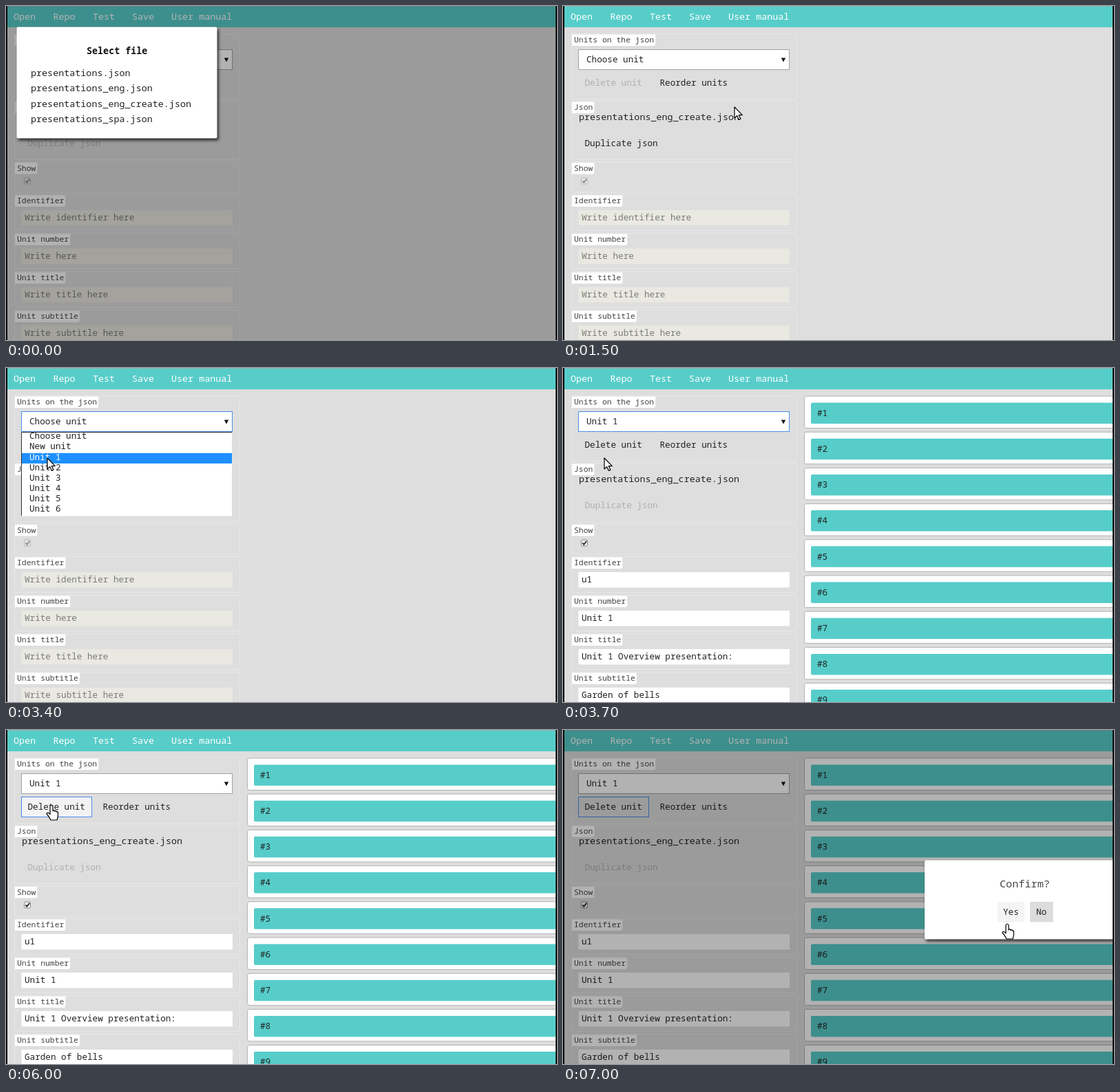
Animation of 800 by 486 pixels, one loop 7100 ms. Source, as an HTML page:

```html
<!DOCTYPE html>
<html lang="en">
<head>
<meta charset="utf-8">
<style>
html, body { margin: 0; width: 100%; height: 100%; overflow: hidden; background: #000; }
svg { display: block; }
text { font-family: "Noto Sans Mono", "DejaVu Sans Mono", monospace; }
.dialog { filter: drop-shadow(2px 3px 2px rgba(0, 0, 0, .75)); }
</style>
</head>
<body>
<svg width="800" height="486" viewBox="0 0 800 486">
  <g id="page"></g>
  <rect id="shade" width="800" height="486"/>
  <g id="popup"></g>
  <path d="M0 0H2V486H0ZM798 0H800V486H798Z"/>
  <path id="cursor" fill="#fff" stroke="#000" stroke-width="1.2" stroke-linejoin="round"/>
</svg>
<script>
const LOOP = 7100, STEP = 100;
const TEAL = '#57cdc9', BLUE = '#4a8de8', INK = '#222';
const SMALL = 11.4, MID = 12.65, BIG = 13.4;
const FILES = ['presentations.json', 'presentations_eng.json', 'presentations_eng_create.json', 'presentations_spa.json'];
const OPTIONS = ['Choose unit', 'New unit', 'Unit 1', 'Unit 2', 'Unit 3', 'Unit 4', 'Unit 5', 'Unit 6'];
// legend, box top, placeholder, loaded value
const FIELDS = [
  ['Identifier', 275, 'Write identifier here', 'u1'],
  ['Unit number', 331, 'Write here', 'Unit 1'],
  ['Unit title', 387, 'Write title here', 'Unit 1 Overview presentation:'],
  ['Unit subtitle', 443, 'Write subtitle here', 'Garden of bells']
];
const ARROW = 'M0 0V16L3.7 12.6L6.4 18.4L8.9 17.3L6.3 11.7H11.3Z';
const HAND = 'M-2 2Q0 -1.5 2 2V9Q4 6.5 5 9.5Q7 7.5 8 10.5Q9.5 9 9.5 12V15Q9.5 18 8 22H-1Q-4 16 -7 13Q-6 9.5 -2 13.5Z';
// pointer stops: time, x, y
const PATH = [
  [0, 720, 500], [800, 266, 150], [900, 264, 150], [1500, 249, 147], [1600, 249, 147],
  [2400, 130, 80], [2600, 130, 80], [3400, 60, 131], [3900, 60, 131], [4100, 76, 131],
  [4300, 76, 131], [4400, 83, 131], [4800, 83, 131], [5600, 66, 111], [5700, 66, 109],
  [6100, 66, 109], [7000, 645, 282], [LOOP, 645, 282]
];

const el = id => document.getElementById(id);
const clamp = v => Math.max(0, Math.min(1, v));
const rect = (x, y, w, h, fill, extra = '') =>
  `<rect x="${x}" y="${y}" width="${w}" height="${h}" fill="${fill}" ${extra}/>`;
const text = (x, y, size, s, fill = INK, extra = '') =>
  `<text x="${x}" y="${y}" font-size="${size}" fill="${fill}" ${extra}>${s}</text>`;
const inside = (p, x, y, w, h) => p.x >= x && p.x < x + w && p.y >= y && p.y < y + h;

function group(label, y, h) {
  const tab = label.length * 6.84 + 5;
  return rect(12.5, y - .5, 327, h, 'none', 'stroke="#e7e7e7" rx="2"') +
    `<path d="M13 ${y + .5}h${tab}v13.5q0 3 -3 3h-${tab - 3}z" fill="#fff"/>` +
    text(16, y + 12.3, SMALL, label, '#444');
}

function pointer(t) {
  const i = PATH.findIndex(k => k[0] > t);
  const [t0, x0, y0] = PATH[i - 1], [t1, x1, y1] = PATH[i];
  const u = (t - t0) / (t1 - t0), e = u * u * (3 - 2 * u);
  return { x: x0 + (x1 - x0) * e, y: y0 + (y1 - y0) * e };
}

function page(s) {
  let out = rect(0, 0, 800, 486, '#dedede') + rect(0, 0, 800, 31, TEAL) + rect(0, 0, 800, 1, '#8fb5b4');
  [['Open', 11], ['Repo', 68.5], ['Test', 126], ['Save', 183], ['User manual', 240]]
    .forEach(([label, x]) => out += text(x, 20, BIG, label, '#fff'));

  out += group('Units on the json', 41, 95) +
    rect(22.5, 63.5, 306, 29, '#fff', `stroke="${s.focus === 'select' ? BLUE : '#a3a3a3'}"`) +
    text(34, 82, MID, s.unit ? 'Unit 1' : 'Choose unit') +
    `<path d="M316.8 75.5h6.4l-3.2 6z" fill="#111"/>`;
  if (s.hover === 'delete') out += rect(22.5, 97, 102, 30, '#f3f3f3');
  if (s.focus === 'delete') out += rect(22.5, 97.5, 102, 29, 'none', `stroke="${BLUE}"`);
  out += text(31.5, 116, MID, 'Delete unit', s.unit ? INK : '#b0b0b0') +
    text(140.5, 116, MID, 'Reorder units');

  out += group('Json', 139, 85) +
    (s.file ? text(23, 166, BIG, FILES[2]) : '') +
    text(31.5, 204, MID, 'Duplicate json', s.file && !s.unit ? INK : '#b0b0b0');

  const tick = s.unit ? INK : '#888';
  out += group('Show', 227.5, 44) +
    rect(26.5, 250, 9, 9, s.unit ? '#f4f4f4' : '#e4e4e4', `rx="1.5" stroke="${s.unit ? '#888' : '#b5b5b5'}"`) +
    `<path d="M28.3 254.5l2 2.3l4 -5" fill="none" stroke="${tick}" stroke-width="1.8"/>`;

  for (const [label, y, hint, value] of FIELDS)
    out += group(label, y, 52) + rect(22.5, y + 22, 306.5, 22.5, s.unit ? '#fff' : '#e9e8e1') +
      text(27, y + 37.3, MID, s.unit ? value : hint, s.unit ? INK : '#7c7c7a');

  if (s.unit) for (let i = 0; i < 9; i++) {
    const y = 41 + i * 52.2;
    out += rect(350.5, y, 470, 46.5, '#fff', 'rx="3" stroke="#b2b2b2"') +
      rect(360, y + 9.5, 450, 30.5, TEAL, 'rx="2"') + text(369, y + 28.7, MID, '#' + (i + 1));
  }

  if (s.open) {
    out += rect(22, 93, 306, 122.5, '#fff');
    OPTIONS.forEach((label, i) => {
      const y = 93.5 + i * 15.15, on = i === s.row;
      if (on) out += rect(22, y, 306, 15.15, '#1e90ff');
      out += text(34, y + 9.8, MID, label, on ? '#fff' : INK);
    });
    out += '<path d="M22.5 215V93.5H328" fill="none" stroke="#333"/>';
  }
  return out;
}

function fileDialog(row) {
  return '<g class="dialog">' + rect(15.5, 30.5, 291, 162, '#fff', 'rx="2"') + '</g>' +
    text(117, 70, BIG, 'Select file', '#111', 'font-weight="700"') +
    (row >= 0 ? rect(33, 89 + row * 22.4, 256, 18.5, '#dcdcdc') : '') +
    FILES.map((name, i) => text(36, 102 + i * 22.4, BIG, name)).join('');
}

function confirmDialog(hover) {
  return '<g class="dialog">' + rect(525, 189.5, 292, 115, '#fff', 'rx="2"') + '</g>' +
    text(634, 228.5, 15.2, 'Confirm?', '#444') +
    rect(631, 250, 39, 29.5, hover ? '#f4f4f4' : '#dcdcdc') + text(639, 269, MID, 'Yes') +
    rect(678, 250, 33.5, 29.5, '#dcdcdc') + text(687, 269, MID, 'No');
}

const drawn = {};
function show(id, html) {
  if (drawn[id] !== html) el(id).innerHTML = drawn[id] = html;
}

function render(t) {
  const p = pointer(t);
  const picking = 1 - clamp((t - 800) / 500), asking = clamp((t - 6000) / 400);
  const fileRow = picking > 0 ? FILES.findIndex((_, i) => inside(p, 33, 89 + i * 22.4, 256, 18.5)) : -1;
  const onDelete = t >= 4900 && !asking && inside(p, 22, 97, 102, 30);
  const onYes = asking > 0 && inside(p, 631, 250, 39, 34);

  show('page', page({
    file: t >= 900,
    unit: t >= 3700,
    open: t >= 2700 && t < 3700,
    row: Math.max(0, Math.floor((p.y - 93.5) / 15.15)),
    focus: t < 2700 ? '' : t < 5900 ? 'select' : 'delete',
    hover: onDelete ? 'delete' : ''
  }));
  show('popup', picking > 0 ? fileDialog(fileRow) : asking > 0 ? confirmDialog(onYes) : '');
  const alpha = Math.max(picking, asking);
  el('popup').setAttribute('opacity', alpha);
  el('shade').setAttribute('opacity', alpha * .3);
  el('cursor').setAttribute('d', fileRow >= 0 || onDelete || onYes ? HAND : ARROW);
  el('cursor').setAttribute('transform', `translate(${p.x} ${p.y})`);
}

const start = performance.now();
function tick() {
  const t = (performance.now() - start) % LOOP;
  render(Math.floor(t / STEP) * STEP);
  requestAnimationFrame(tick);
}
tick();
</script>
</body>
</html>
```
